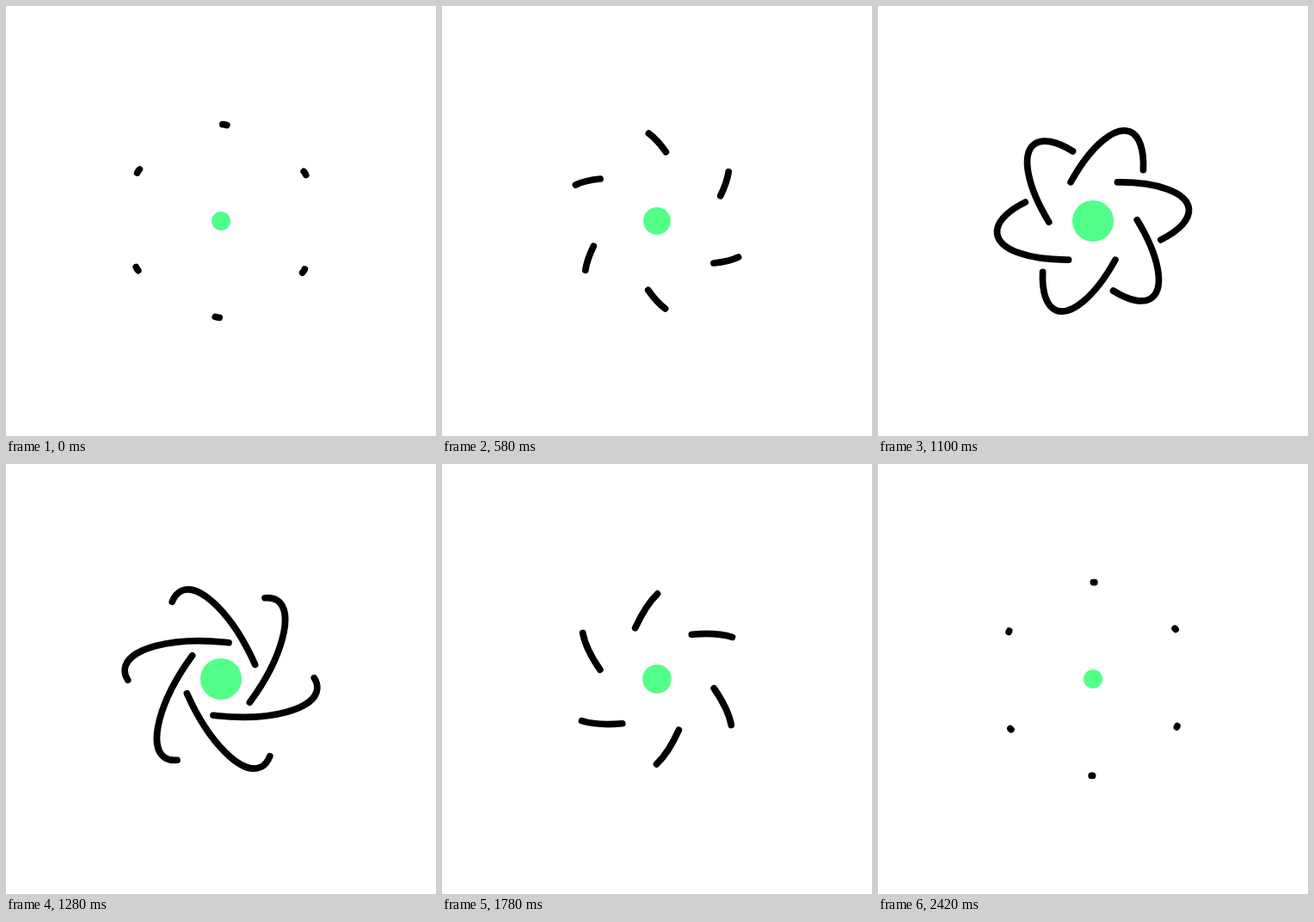
Recreate the animation shown at these times as an HTML page. Size 500 by 500 pixels, loop 2440 ms.

```html
<!DOCTYPE html>
<html lang="en">
<head>
<meta charset="utf-8">
<title>Orbit loader</title>
<style>
  html, body { margin: 0; width: 100%; height: 100%; overflow: hidden; background: #fff; }
  svg { display: block; width: 100vw; height: 100vh; }
  ellipse { fill: none; stroke: #000; stroke-width: 7.7; stroke-linecap: round; }
</style>
</head>
<body>
<svg viewBox="0 0 500 500">
  <g transform="translate(250 250)">
    <ellipse rx="112.4" ry="43"/>
    <ellipse rx="112.4" ry="43"/>
    <ellipse rx="112.4" ry="43"/>
    <circle r="11" fill="#52ff88"/>
  </g>
</svg>
<script>
const STEP = 20, STEPS = 122, LAST = STEPS - 1, PEAK = 60.5;
const TAIL_FROM = 8, HEAD_TO = 119;
const orbits = [...document.querySelectorAll('ellipse')];
const core = document.querySelector('circle');
const total = orbits[0].getTotalLength();
const half = total / 2;
const shifts = [0.5, -3.3, -1.7]; // where each orbit's stroke begins, from its tip

const clamp = x => Math.min(1, Math.max(0, x));

// cubic-bezier(x1, 0, x2, 1)
function ease(x1, x2, x) {
  x = clamp(x);
  let lo = 0, hi = 1;
  for (let i = 0; i < 30; i++) {
    const t = (lo + hi) / 2, r = 1 - t;
    if (3 * x1 * t * r * r + 3 * x2 * t * t * r + t * t * t < x) lo = t;
    else hi = t;
  }
  const t = (lo + hi) / 2;
  return t * t * (3 - 2 * t);
}

function draw(ms) {
  const n = Math.floor(ms / STEP + 1e-6) % STEPS;
  const tail = total * 0.997 * ease(0.534, 0.487, (n - TAIL_FROM) / (LAST - TAIL_FROM));
  const head = total * (0.01 + 0.99 * ease(0.569, 0.239, n / HEAD_TO));
  const len = head - tail;

  orbits.forEach((orbit, i) => {
    const start = (tail + shifts[i] + half) % half;
    orbit.setAttribute('transform', `rotate(${-89.3 + 60 * i + 180 * n / LAST})`);
    orbit.setAttribute('stroke-dasharray', `${len} ${half - len}`);
    orbit.setAttribute('stroke-dashoffset', half - start);
  });

  const swell = n < PEAK
    ? ease(0.6, 0.51, n / PEAK)
    : 1 - ease(0.345, 0.49, (n - PEAK) / (LAST - PEAK));
  core.setAttribute('r', 11 + 13.2 * swell);
}

let begin;
function tick(now) {
  begin ??= now;
  draw(now - begin);
  requestAnimationFrame(tick);
}
draw(0);
requestAnimationFrame(tick);
</script>
</body>
</html>
```
